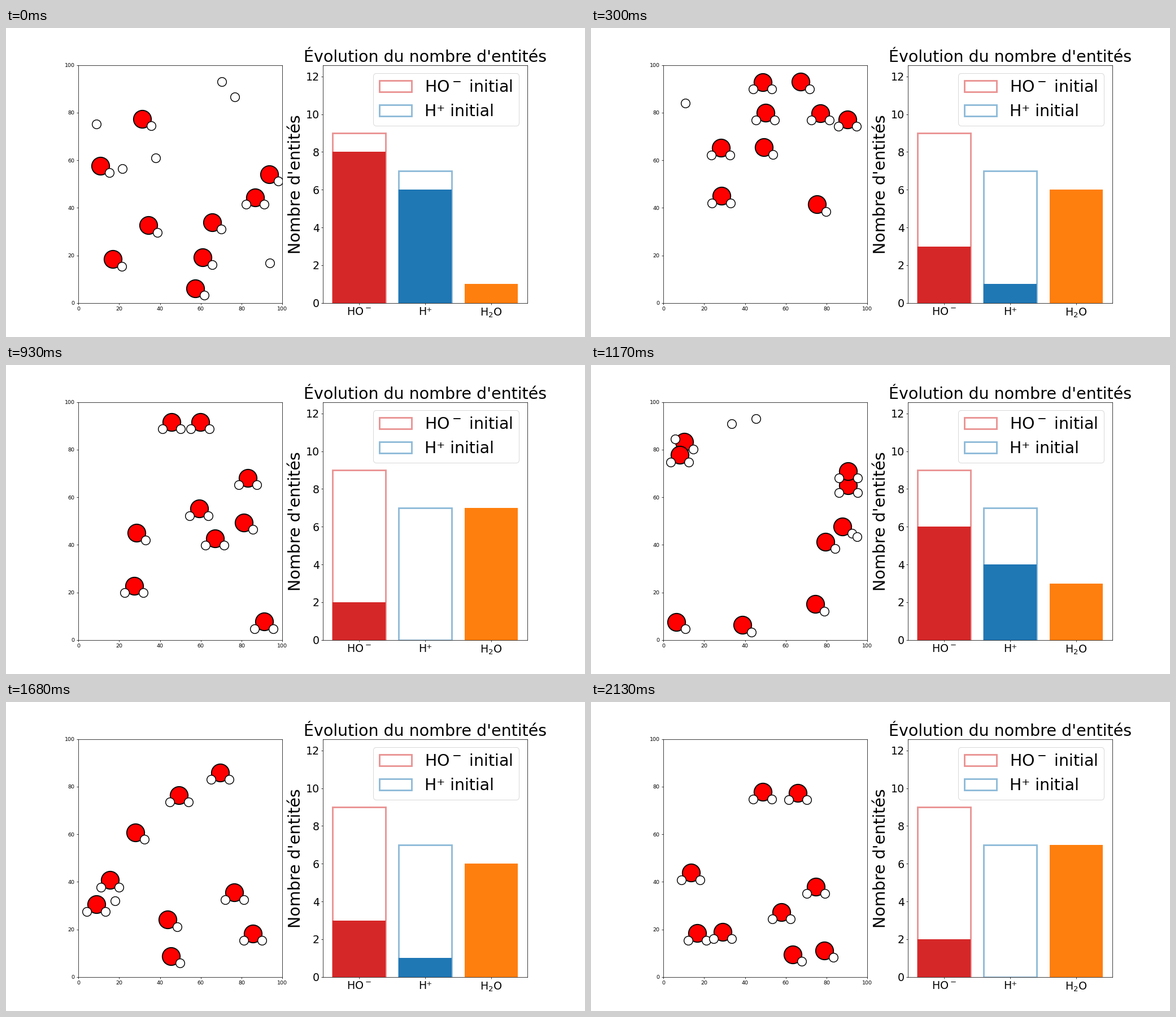
Animation, 1025 px wide and 547 px high, one loop 2.16 s. Source, as a matplotlib script:

```python
import itertools
import numpy as np
import matplotlib.pyplot as plt
from matplotlib.animation import FuncAnimation

DPI = 547 / 8
CYCLE, REPEATS, INTERVAL = 36, 2, 30
LO, HI = 5, 95          # walls met by the particle centres
SPEED = 9               # preferred speed, units per frame
START_OH, START_H = 9, 7
BOND = np.array([4.5, -3.0])
MIRROR = np.array([-1, 1])

# Way-points of the nine oxygen atoms at the times in KEYS
KEYS = [0, 10, 20, 31, 35]
OXYGEN = np.array([
    [(57.2, 6.2), (75.3, 41.4), (45.3, 8.8), (81.0, 49.4), (78.8, 11.2)],
    [(34.2, 32.7), (49.2, 65.4), (27.8, 60.8), (28.4, 45.1), (63.3, 9.5)],
    [(61.0, 19.2), (67.2, 93.0), (43.8, 24.2), (27.3, 22.8), (16.6, 18.5)],
    [(86.7, 44.4), (90.3, 77.2), (85.5, 18.3), (91.0, 7.8), (74.8, 38.0)],
    [(31.2, 77.4), (48.6, 92.9), (49.4, 76.5), (45.6, 91.7), (48.6, 77.8)],
    [(10.7, 57.7), (28.1, 65.2), (15.5, 40.7), (66.9, 42.8), (29.1, 19.0)],
    [(93.5, 54.2), (76.9, 79.8), (69.5, 86.0), (59.7, 91.7), (65.9, 77.4)],
    [(65.5, 34.0), (50.0, 80.0), (76.5, 35.5), (83.0, 68.2), (57.8, 27.3)],
    [(16.9, 18.4), (28.4, 45.0), (8.7, 30.6), (59.1, 55.2), (13.4, 43.8)],
])
PROTONS = np.array([(8.7, 75.3), (21.7, 56.5), (37.8, 61.0),
                    (70.2, 93.1), (76.6, 86.7), (93.8, 16.9)])
LAST_STOPS = [(10.9, 84.0), (18.1, 32.1)]   # the proton that reacts last
EARLY_MERGES = [1, 2, 4, 6, 9]
LAST_MERGE, LAST_PARTNER, FIRST_WATER = 24, 2, 3


def fold(u):
    """Reflect a free path back between the walls."""
    span = HI - LO
    return LO + span - np.abs((u - LO) % (2 * span) - span)


def leg(p, q, n):
    """Straight path from p to q in n frames, bouncing on the walls."""
    turn = 2 * (HI - LO)
    images = [[s + k * turn for s in (c, 2 * LO - c) for k in (-1, 0, 1)]
              for c in q]
    ends = np.array(list(itertools.product(*images)))
    pace = np.hypot(*(ends - p).T) / n
    end = ends[np.argmin(np.abs(pace - SPEED))]
    t = np.linspace(0, 1, n + 1)[:, None]
    return fold(p + t * (end - p))


def route(points, times):
    path = [np.array([points[0]], float)]
    for p, q, a, b in zip(points, points[1:], times, times[1:]):
        path.append(leg(np.array(p), q, b - a)[1:])
    return np.concatenate(path)


def plan():
    oxygen = np.array([route(p, KEYS) for p in OXYGEN])
    bonded = {FIRST_WATER: 0}
    free = list(range(1, len(PROTONS)))
    waiting = list(range(FIRST_WATER + 1, len(OXYGEN)))
    paths = []
    for m in EARLY_MERGES:
        def misfit(pair):
            gap = np.hypot(*(oxygen[pair[1], m] - PROTONS[pair[0]]))
            return abs(gap / m - SPEED)
        h, o = min(itertools.product(free, waiting), key=misfit)
        free.remove(h)
        waiting.remove(o)
        bonded[o] = m
        paths.append(route([PROTONS[h], oxygen[o, m]], [0, m])[:-1])
    stops = [PROTONS[0], *LAST_STOPS, oxygen[LAST_PARTNER, LAST_MERGE]]
    paths.append(route(stops, [0, 10, 20, LAST_MERGE])[:-1])
    bonded[LAST_PARTNER] = LAST_MERGE
    return oxygen, bonded, paths


oxygen, bonded, proton_paths = plan()

fig, (box, chart) = plt.subplots(
    1, 2, figsize=(1025 / DPI + 1e-9, 8), dpi=DPI)

box.set(xlim=(0, 100), ylim=(0, 100))
big, = box.plot([], [], "o", ms=33, mfc="red", mec="black", mew=2)
small, = box.plot([], [], "o", ms=16.5, mfc="white", mec="black", mew=1.5)

OH = r"HO$^{\hspace{0.2}{-}\hspace{0.2}}$"
for x, count, color, name in [(0, START_OH, "tab:red", OH),
                              (1, START_H, "tab:blue", "H⁺")]:
    chart.bar(x, count, fill=False, edgecolor=color, alpha=0.5,
              linewidth=3, label=name + " initial")
bars = chart.bar([0, 1, 2], [0, 0, 0],
                 color=["tab:red", "tab:blue", "tab:orange"])
chart.set(xlim=(-0.54, 2.54), ylim=(0, 1.4 * START_OH))
chart.set_xticks([0, 1, 2], [OH, "H⁺", "H$_2$O"])
chart.set_yticks(range(0, 13, 2))
chart.tick_params(labelsize=20)
chart.set_title("Évolution du nombre d'entités", fontsize=30)
chart.set_ylabel("Nombre d'entités", fontsize=30)
chart.legend(fontsize=30, loc="upper right")


def draw(i):
    t = i % CYCLE
    centres = oxygen[:, t]
    water = [o for o, m in bonded.items() if m <= t]
    hydrogens = [centres + BOND, centres[water] + BOND * MIRROR]
    hydrogens += [p[t:t + 1] for p in proton_paths]
    big.set_data(*centres.T)
    small.set_data(*np.concatenate(hydrogens).T)
    n = len(water)
    for bar, h in zip(bars, (START_OH - n, START_H - n, n)):
        bar.set_height(h)
    return [big, small, *bars]


anim = FuncAnimation(fig, draw, frames=CYCLE * REPEATS, interval=INTERVAL,
                     init_func=lambda: draw(0), repeat=True, repeat_delay=0)
plt.show()
```
